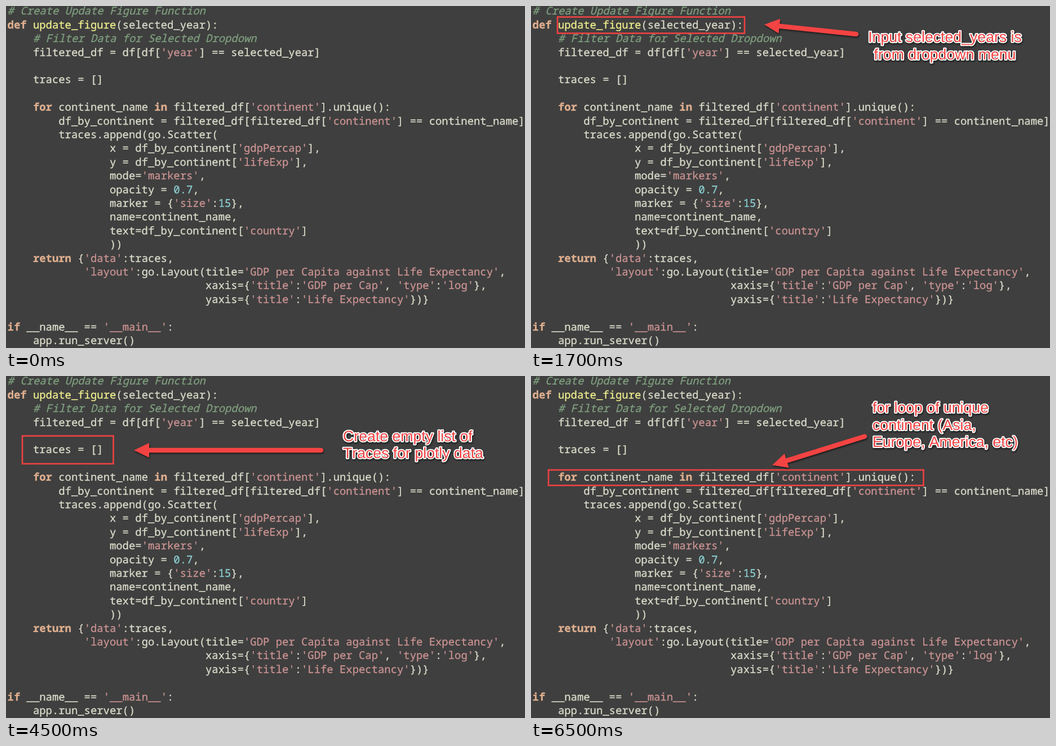
These frames come from a looping animation (921 by 608 pixels, 8000 ms). An HTML page:

```html
<!DOCTYPE html>
<html lang="en">
<head>
<meta charset="utf-8">
<style>
  html, body { margin: 0; width: 100%; height: 100%; overflow: hidden; background: #3f3f3f; }
  svg { display: block; width: 100%; height: 100%; text-rendering: geometricPrecision; }
  #code { font: 18.9px "Noto Sans Mono", monospace; color: #dcdccc; }
  #code text { white-space: pre; }
  #code text, #code tspan { fill: currentColor; stroke: currentColor; stroke-width: .3; }
  .comment { color: #7f9f7f; font-style: italic; }
  .string { color: #cc9393; }
  .keyword { color: #dfaf8f; font-weight: bold; }
  .def { color: #efef8f; }
  .number { color: #8cd0d3; }
  .box { fill: none; stroke: #f04141; stroke-width: 2.6; }
  .arrow, .label { filter: drop-shadow(1px 2px 1.5px rgba(0, 0, 0, .6)); }
  .arrow { fill: #f44343; stroke: #f44343; }
  .label {
    font: 26.67px "Liberation Sans", Arial, sans-serif; font-kerning: none;
    fill: #f44343; stroke: #fff; stroke-width: 4; stroke-linejoin: round; paint-order: stroke;
  }
</style>
</head>
<body>
<svg viewBox="0 0 921 608"><g id="code"></g><g id="notes"></g></svg>
<script>
const source = `# Create Update Figure Function
def update_figure(selected_year):
    # Filter Data for Selected Dropdown
    filtered_df = df[df['year'] == selected_year]

    traces = []

    for continent_name in filtered_df['continent'].unique():
        df_by_continent = filtered_df[filtered_df['continent'] == continent_name]
        traces.append(go.Scatter(
                x = df_by_continent['gdpPercap'],
                y = df_by_continent['lifeExp'],
                mode='markers',
                opacity = 0.7,
                marker = {'size':15},
                name=continent_name,
                text=df_by_continent['country']
                ))
    return {'data':traces,
            'layout':go.Layout(title='GDP per Capita against Life Expectancy',
                               xaxis={'title':'GDP per Cap', 'type':'log'},
                               yaxis={'title':'Life Expectancy'})}

if __name__ == '__main__':
    app.run_server()`;

const token = /(?<comment>#.*)|(?<string>'[^']*')|(?<keyword>\b(?:def|for|in|return|if)\b)|(?<def>\bupdate_figure\b)|(?<number>\b\d[\d.]*)/g;

function highlight(line) {
  return line.replace(token, (match, ...rest) => {
    const groups = rest.at(-1);
    const kind = Object.keys(groups).find(k => groups[k]);
    return `<tspan class="${kind}">${match}</tspan>`;
  });
}

document.getElementById('code').innerHTML = source.split('\n')
  .map((line, i) => `<text x="2.6" y="${15.4 + 24.4 * i}">${highlight(line)}</text>`)
  .join('');

// box: left, top, right, bottom; arrow: tip x, y, tail x, y; label: x, first baseline
const notes = [
  { start: 500, box: [47, 19.5, 379, 48.5], arrow: [414, 33, 577, 50], label: [734.5, 64],
    anchor: 'middle', lines: ['Input selected_years is', 'from dropdown menu'] },
  { start: 2500, box: [33, 66.5, 569, 100], arrow: [511, 104, 604, 137.5], label: [746.5, 115.5],
    anchor: 'middle', lines: ['Using selected years as', 'filter for Dataframe'] },
  { start: 4500, box: [29, 106.5, 190.5, 156], arrow: [227, 132, 559, 132], label: [598, 115.5],
    anchor: 'start', lines: ['Create empty list of', 'Traces for plotly data'] },
  { start: 6500, box: [31, 167, 696.5, 194.5], arrow: [428, 158.5, 592, 107.5], label: [606, 65],
    anchor: 'start', lines: ['for loop of unique', 'continent (Asia,', 'Europe, America, etc)'] },
];

function drawNote({ box: [l, t, r, b], arrow: [x, y, tailX, tailY], label, anchor, lines }) {
  const length = Math.hypot(tailX - x, tailY - y);
  const angle = Math.atan2(tailY - y, tailX - x) * 180 / Math.PI;
  const rows = lines.map((s, i) =>
    `<text x="${label[0]}" y="${label[1] + 30.6 * i}">${s}</text>`).join('');
  return `<g visibility="hidden">
    <rect class="box" x="${l}" y="${t}" width="${r - l}" height="${b - t}"/>
    <g class="arrow"><g transform="translate(${x} ${y}) rotate(${angle})">
      <path d="M0 0L27 -13V13Z" stroke="none"/>
      <path d="M24 0H${length}" stroke-width="8.5" stroke-linecap="round"/>
    </g></g>
    <g class="label" text-anchor="${anchor}">${rows}</g>
  </g>`;
}

const layer = document.getElementById('notes');
layer.innerHTML = notes.map(drawNote).join('');

function frame(now) {
  const time = now % 8000;
  const current = notes.findLastIndex(note => time >= note.start);
  [...layer.children].forEach((g, i) =>
    g.setAttribute('visibility', i === current ? 'visible' : 'hidden'));
  requestAnimationFrame(frame);
}
requestAnimationFrame(frame);
</script>
</body>
</html>
```
